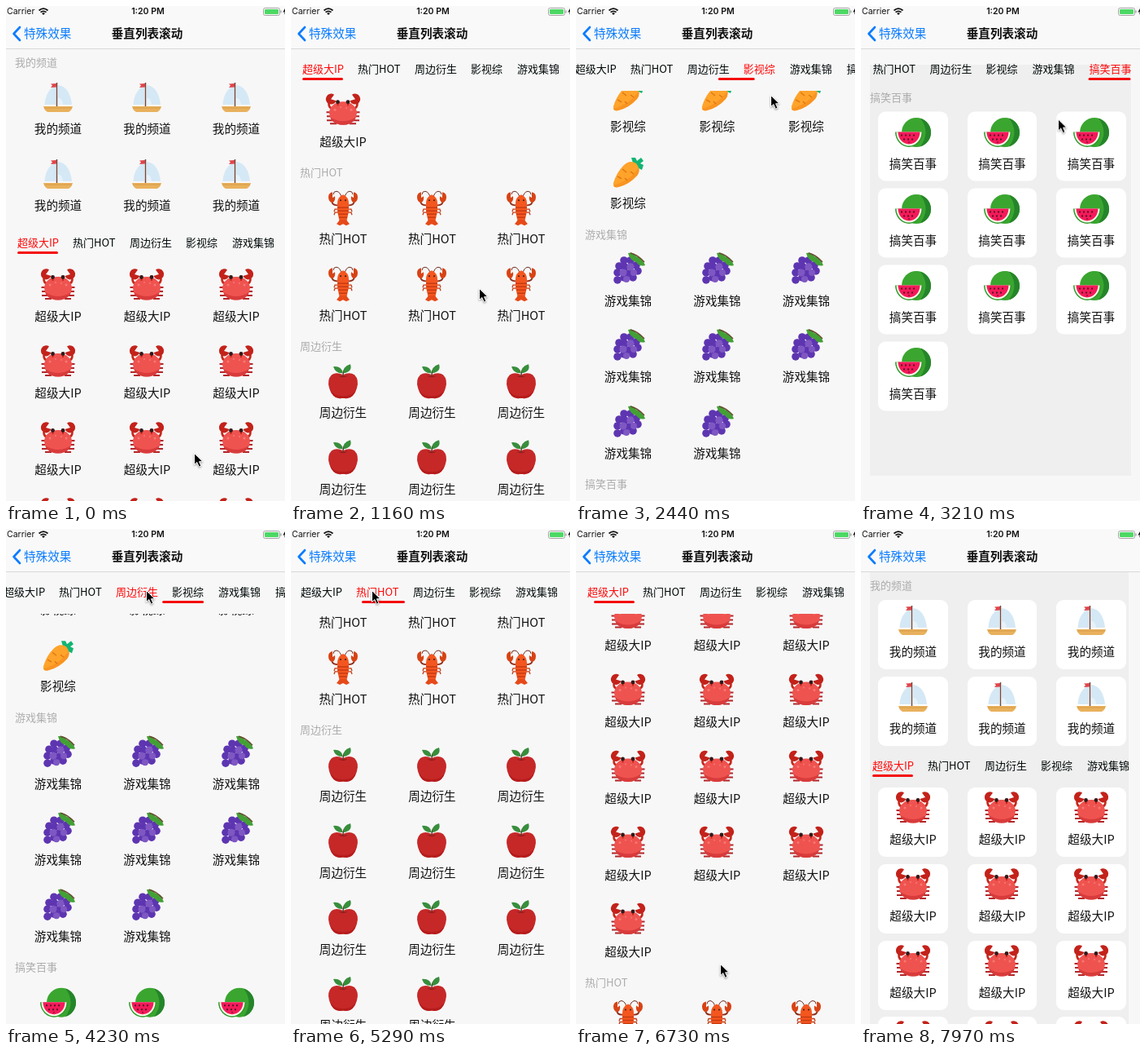
Write an HTML page that moves like this. It is 343x607 px and loops after 8.28 s.

```html
<!DOCTYPE html>
<html lang="zh-CN">
<head>
<meta charset="utf-8">
<title>垂直列表滚动</title>
<style>
@property --scroll { syntax: "<number>"; inherits: true; initial-value: 0; }
@property --shift { syntax: "<number>"; inherits: true; initial-value: 0; }
@property --sel { syntax: "<number>"; inherits: true; initial-value: 0; }
@property --card { syntax: "<number>"; inherits: true; initial-value: 0; }

html, body { margin: 0; width: 100%; height: 100%; overflow: hidden; background: #f7f7f7; }
#app {
  position: relative; width: 343px; height: 607px; overflow: hidden;
  color: #111; background: #f7f7f7;
  font-family: "Noto Sans CJK SC", "Noto Sans CJK", sans-serif;
  animation: scroll 8.28s linear infinite, shift 8.28s linear infinite,
    select 8.28s step-end infinite, cards 8.28s step-end infinite;
}
#app div, #app span, #app svg { position: absolute; white-space: nowrap; }

/* status and navigation bars */
#nav { left: 0; top: 0; width: 343px; height: 52px; background: #f9f9f9; border-bottom: 1px solid #d9d9d9; }
.status { top: 0; line-height: 14px; font-family: Inter, sans-serif; }
.carrier { left: 1px; font-size: 10.5px; }
.time { left: 125px; width: 99px; text-align: center; font-size: 10.6px; font-weight: 600; }
#nav svg { left: 0; top: 0; }
.back, .title { top: 23px; line-height: 20px; font-size: 14.6px; }
.back { left: 22px; color: #0a7cff; }
.title { left: 102px; width: 143px; text-align: center; font-weight: 600; }

/* scrolling page */
#view { left: 0; top: 53px; width: 343px; height: 554px; overflow: hidden; --rest: max(0px, (213.1 - var(--scroll)) * 1px); }
#panel { inset: 0; background: #efefef; animation: panel 8.28s step-end infinite; }
#mine { left: 0; top: 0; width: 343px; transform: translateY(calc(var(--scroll) * -1px)); }
#tabs { left: 0; top: 0; width: 343px; height: 51px; overflow: hidden; transform: translateY(var(--rest)); }
#strip { left: 0; top: 0; transform: translateX(calc(var(--shift) * -1px)); }
#strip span {
  top: 14px; line-height: 20px; font-size: 13px;
  color: rgb(calc(255 * (1 - min(1, max(var(--sel) - var(--i), var(--i) - var(--sel))))), 8, 8);
}
#line { top: 35px; height: 3px; border-radius: 2px; background: #f50c0c; animation: line 8.28s linear infinite; }
#list { left: 0; top: calc(var(--rest) + 51px); bottom: 0; width: 343px; overflow: hidden; }
#rows { left: 0; top: 0; transform: translateY(min(0px, (213.1 - var(--scroll)) * 1px)); }

.head { left: 11px; line-height: 34px; font-size: 13px; color: #acacac; margin-top: -.7px; }
.item { width: 85.4px; height: 85.3px; }
.item::before {
  content: ""; position: absolute; inset: 0; border-radius: 9px; background: #fff; opacity: var(--card);
}
.item svg { left: 17.7px; top: 0; width: 50px; height: 50px; }
.item span { left: -10px; right: -10px; top: 53.4px; text-align: center; line-height: 20px; font-size: 14.6px; }
#cursor { left: 0; top: 0; filter: drop-shadow(0 1px 1px #0006); animation: cursor 8.28s linear infinite; }

@keyframes scroll {
  0%, 6.04% { --scroll: 0; }
  9.66% { --scroll: 230; }
  14.01% { --scroll: 589.5; }
  15.82% { --scroll: 650; }
  18.84% { --scroll: 684; }
  25.85% { --scroll: 770; }
  26.57% { --scroll: 895; }
  28.14% { --scroll: 1297; }
  29.47% { --scroll: 1434.2; }
  31.4% { --scroll: 1603; }
  34.42% { --scroll: 1820; }
  35.87% { --scroll: 1895; }
  38.04%, 48.91% { --scroll: 1909.6; animation-timing-function: ease-in-out; }
  53.74%, 62.2% { --scroll: 895.5; }
  63.89% { --scroll: 761.6; }
  65.7% { --scroll: 690; }
  68.12%, 76.45% { --scroll: 682; }
  77.66% { --scroll: 590; }
  79.71% { --scroll: 380; }
  81.28% { --scroll: 239.5; }
  84.54% { --scroll: 0; }
  86.35% { --scroll: -60; }
  88.16% { --scroll: -42; }
  91.79% { --scroll: -4; }
  93.6%, 100% { --scroll: 0; }
}
@keyframes shift {
  0%, 26.57% { --shift: 0; }
  28.14% { --shift: 6; }
  29.47% { --shift: 15; }
  32%, 48.91% { --shift: 67.5; animation-timing-function: ease-in-out; }
  52%, 62.56% { --shift: 6; }
  63.89% { --shift: 2; }
  65.2%, 100% { --shift: 0; }
}
@keyframes select {
  0% { --sel: 0; }
  18.84% { --sel: 1; }
  26.57% { --sel: 2; }
  28.14% { --sel: 3; }
  31.4% { --sel: 4; }
  34.42% { --sel: 5; }
  48.91% { --sel: 2; }
  62.2% { --sel: 1; }
  79.71%, 100% { --sel: 0; }
}
@keyframes line {
  0%, 18.84% { left: 14px; width: 50px; }
  21.74%, 26.57% { left: 82px; width: 52px; }
  28.14% { left: 152px; width: 51px; }
  29.47% { left: 190px; width: 45px; }
  30.8%, 31.4% { left: 221px; width: 39px; }
  33.2%, 34.42% { left: 278px; width: 51px; }
  36.2%, 48.91% { left: 347px; width: 52px; }
  52%, 62.2% { left: 152px; width: 51px; }
  63.89% { left: 89px; width: 53px; }
  64.4%, 79.71% { left: 82px; width: 52px; }
  81.28% { left: 22px; width: 50px; }
  81.7%, 100% { left: 14px; width: 50px; }
}
@keyframes cards {
  0% { --card: 0; }
  35.87% { --card: 1; }
  46.74% { --card: 0; }
  88.16%, 100% { --card: 1; }
}
@keyframes panel {
  0% { opacity: 0; clip-path: inset(19px 11px 31px 11px); }
  35.87% { opacity: 1; clip-path: inset(19px 11px 31px 11px); }
  46.74% { opacity: 0; clip-path: inset(19px 11px 31px 11px); }
  88.16%, 100% { opacity: 1; clip-path: inset(0 14px 0 11px); }
}
@keyframes cursor {
  0%, 6.04% { transform: translate(231px, 548px); }
  9.66% { transform: translate(231px, 420px); }
  14.01% { transform: translate(231px, 346px); }
  15.82% { transform: translate(231px, 335px); }
  20%, 25% { transform: translate(236px, 400px); }
  29.47% { transform: translate(239px, 109px); }
  35.87%, 43.5% { transform: translate(242px, 138.5px); }
  46% { transform: translate(224px, 66px); }
  48.5%, 56% { transform: translate(172px, 75px); }
  61.5%, 67.4% { transform: translate(99px, 75px); }
  76.4% { transform: translate(176px, 350px); }
  81.28% { transform: translate(177px, 533px); }
  88.16% { transform: translate(179px, 570px); }
  95%, 100% { transform: translate(190px, 620px); }
}
</style>
</head>
<body>
<svg width="0" height="0" style="position:absolute">
  <symbol id="boat" viewBox="0 0 50 50">
    <path d="M22 11C14 14 9 23 8.5 34H22ZM25 10C35 11 41 21 42 34H25Z" fill="#d5e8f5"/>
    <path d="M25 26Q30 25 31 34H25Z" fill="#e6f2fa"/>
    <path d="M23.5 7V37" stroke="#6d4940" stroke-width="1.5"/>
    <path d="M23 8L16 8.5 18 10.5 16 13 23 12.5Z" fill="#e0454a"/>
    <path d="M7 36H43Q42 41 38 43H12Q8 41 7 36Z" fill="#e9b15d"/>
    <path d="M8 38H42" stroke="#d89c46"/>
  </symbol>

  <symbol id="crab" viewBox="0 0 50 50">
    <path d="M4.5 28H12M5 33H12M5 38H13M9 42H17M45.500 28H38M45 33H38M45 38H37M41 42H33" stroke="#b3262a" stroke-width="2"/>
    <path d="M7.500 17Q7 23 13 24M42.500 17Q43 23 37 24" fill="none" stroke="#c5281c" stroke-width="2.600"/>
    <path d="M10 12 16.500 14A6.500 6.500 0 1 1 14 6.500ZM40 12 33.500 14A6.500 6.500 0 1 0 36 6.500Z" fill="#c3221a"/>
    <path d="M25 15C36 15 42 22 42 29Q41 38 33 42Q25 45 17 42Q9 38 8 29C8 22 14 15 25 15Z" fill="#ef5350"/>
    <path d="M9 34Q25 44 41 34Q39 40 33 42Q25 45 17 42Q11 40 9 34Z" fill="#d83b3b"/>
    <path d="M18.500 16V20M31 16V20" stroke="#c5281c" stroke-width="2"/>
    <g fill="#31191a"><circle cx="18.500" cy="15.500" r="2.400"/><circle cx="31" cy="15.500" r="2.400"/></g>
    <g fill="#f47a72"><circle cx="15" cy="25" r="1.500"/><circle cx="35" cy="25" r="1.500"/><circle cx="22" cy="22" r="1"/><circle cx="29" cy="23" r="1"/></g>
  </symbol>

  <symbol id="lobster" viewBox="0 0 50 50">
    <path d="M23 13Q22 6 17 5Q13 5 13 9M27 13Q28 6 33 5Q37 5 37 9" fill="none" stroke="#6d2c20"/>
    <path d="M19 22Q12 23 11 17M31 22Q38 23 39 17" fill="none" stroke="#8f2f1c" stroke-width="1.800"/>
    <path d="M19 27H15L14 30M19 31H15L14 34M31 27H35L36 30M31 31H35L36 34" fill="none" stroke="#c33d18" stroke-width="1.300"/>
    <path d="M12 6Q7 7 7 12Q7 18 12 19Q16 17 15 11L12 13ZM38 6Q43 7 43 12Q43 18 38 19Q34 17 35 11L38 13Z" fill="#d84315"/>
    <path d="M25 9Q32 12 32 20V30L29.500 41H20.500L18 30V20Q18 12 25 9Z" fill="#f4561f"/>
    <path d="M18 25H32M18.500 29H31.500M19 33H31M20 37H30" stroke="#c83b12" stroke-width="1.400"/>
    <path d="M21 40H29L33 45 29 47 25 45 21 47 17 45Z" fill="#e64a19"/>
    <circle cx="22" cy="16" r="1" fill="#321"/><circle cx="28" cy="16" r="1" fill="#321"/>
  </symbol>

  <symbol id="apple" viewBox="0 0 50 50">
    <path d="M25 17Q33 13 39 17Q45 23 42 33Q38 46 29 46Q25 45 21 46Q12 46 8 33Q5 23 11 17Q17 13 25 17Z" fill="#c62828"/>
    <path d="M8 33Q12 43 25 43T42 33Q38 46 29 46Q25 45 21 46Q12 46 8 33Z" fill="#b71c1c"/>
    <path d="M19 18Q25 22 31 18Q25 19.500 19 18Z" fill="#8e1818"/>
    <path d="M25 19Q25 13 27 10" fill="none" stroke="#5d4037" stroke-width="1.500"/>
    <path d="M25 15Q16 16 13 7Q23 6 25 15ZM26 15Q24 7 34 4Q37 13 26 15Z" fill="#388e3c"/>
  </symbol>

  <symbol id="carrot" viewBox="0 0 50 50">
    <path d="M32 18 29 8 34 8 36 12 41 8 44 12 40 15 44 17 42 23Z" fill="#12b573"/>
    <path d="M19 18Q27 10 35 15Q41 22 36 30Q26 41 13 44Q6 46 7 39Q11 26 19 18Z" fill="#ffa32b"/>
    <path d="M38 20Q40 25 36 30Q26 41 13 44Q8 45 7 42Q28 36 38 20Z" fill="#f99421"/>
    <path d="M18 22 23 26M12 31 17 34M32 28 28 25M24 36 21 33" stroke="#dd7812" stroke-width="1.400"/>
  </symbol>

  <symbol id="grape" viewBox="0 0 50 50">
    <g fill="#5e35b1">
      <circle cx="20" cy="15" r="4.800"/><circle cx="28" cy="15" r="4.800"/><circle cx="35" cy="21" r="4.800"/>
      <circle cx="14" cy="22" r="4.800"/><circle cx="37" cy="28" r="4.800"/><circle cx="21" cy="23" r="4.800"/>
      <circle cx="12" cy="30" r="4.800"/><circle cx="26" cy="31" r="4.800"/><circle cx="31" cy="36" r="4.800"/>
      <circle cx="20" cy="36" r="4.800"/><circle cx="12" cy="39" r="4.800"/>
    </g>
    <g fill="#7e57c2"><circle cx="28" cy="23" r="4.600"/><circle cx="19" cy="30" r="4.500"/><circle cx="32" cy="30" r="4"/><circle cx="23" cy="38" r="4"/></g>
    <path d="M25 6Q31 4 35 10Q43 12 46 21Q39 23 35 17Q27 15 25 6Z" fill="#43a035"/>
    <path d="M28 6Q37 8 45 17" fill="none" stroke="#6a4a32" stroke-width="1.500"/>
  </symbol>

  <symbol id="melon" viewBox="0 0 50 50">
    <circle cx="29" cy="25.500" r="18" fill="#3aa62f"/>
    <path d="M34 8.200A18 18 0 0 1 34 42.800Q47 25 34 8.200Z" fill="#25852a"/>
    <path d="M3 25H37A17 18.500 0 0 1 3 25Z" fill="#2f9a2c"/>
    <path d="M4.500 25H35.500A15.500 17 0 0 1 4.500 25Z" fill="#f4fbe8"/>
    <path d="M6.500 25H33.500A13.500 15 0 0 1 6.500 25Z" fill="#f5195a"/>
    <path d="M11 28V30M16 28V30M21 28V30M26 28V30M14 33V35M19 33V35M24 33V35M20 37V38" stroke="#2b1616" stroke-width="1.600"/>
  </symbol>
</svg>

<div id="app">
  <div id="view">
    <div id="panel"></div>
    <div id="mine"></div>
    <div id="tabs"><div id="strip"><div id="line"></div></div></div>
    <div id="list"><div id="rows"></div></div>
  </div>
  <div id="nav">
    <span class="status carrier">Carrier</span>
    <span class="status time">1:20 PM</span>
    <svg width="343" height="52" fill="none">
      <path d="M40.500 5.500Q46 .8 51.500 5.500M42.500 7.700Q46 5 49.500 7.700" stroke="#111" stroke-width="1.700"/>
      <path d="M44 9Q46 7.500 48 9L46 11Z" fill="#111"/>
      <rect x="316.500" y="2.500" width="20" height="9" rx="2" stroke="#a5a5a5"/>
      <rect x="318" y="4" width="17" height="6" rx="1" fill="#4cd964"/>
      <path d="M338 5.500V8.500" stroke="#a5a5a5" stroke-width="1.300"/>
      <path d="M343 3 340.500 7.500H343ZM342 7H343V11Z" fill="#111"/>
      <path d="M17 26 9.500 34 17 42" stroke="#0a7cff" stroke-width="2.600" stroke-linecap="round" stroke-linejoin="round"/>
    </svg>
    <span class="back">特殊效果</span>
    <span class="title">垂直列表滚动</span>
  </div>
  <svg id="cursor" width="16" height="22" overflow="visible">
    <path d="M.5 .5V14.500L3.800 11.500 6.300 17.200 8.900 16 6.500 10.700H11Z" fill="#000" stroke="#fff"/>
  </svg>
</div>

<script>
const HEAD = 34, CARD = 85.3, GAP = 8.5, LEFT = 21.3, COL = 109.5;
const sections = [
  ["超级大IP", "crab", 13, 14],
  ["热门HOT", "lobster", 6, 82],
  ["周边衍生", "apple", 11, 152],
  ["影视综", "carrot", 7, 221],
  ["游戏集锦", "grape", 8, 278],
  ["搞笑百事", "melon", 10, 348]
];
const byId = id => document.getElementById(id);
const add = (parent, html) => parent.insertAdjacentHTML("beforeend", html);

// Adds one section at y and returns the y below it.
function addSection(parent, y, name, icon, count, headed) {
  if (headed) {
    add(parent, `<div class="head" style="top:${y}px">${name}</div>`);
    y += HEAD;
  }
  for (let i = 0; i < count; i++) {
    const x = LEFT + (i % 3) * COL;
    const top = y + Math.floor(i / 3) * (CARD + GAP);
    add(parent, `<div class="item" style="left:${x}px;top:${top}px">
      <svg><use href="#${icon}"/></svg><span>${name}</span></div>`);
  }
  return y + Math.ceil(count / 3) * (CARD + GAP) - GAP;
}

addSection(byId("mine"), 0, "我的频道", "boat", 6, true);
let y = 0;
sections.forEach(([name, icon, count, x], i) => {
  y = addSection(byId("rows"), y, name, icon, count, i > 0);
  add(byId("strip"), `<span style="left:${x}px;--i:${i}">${name}</span>`);
});
</script>
</body>
</html>
```
